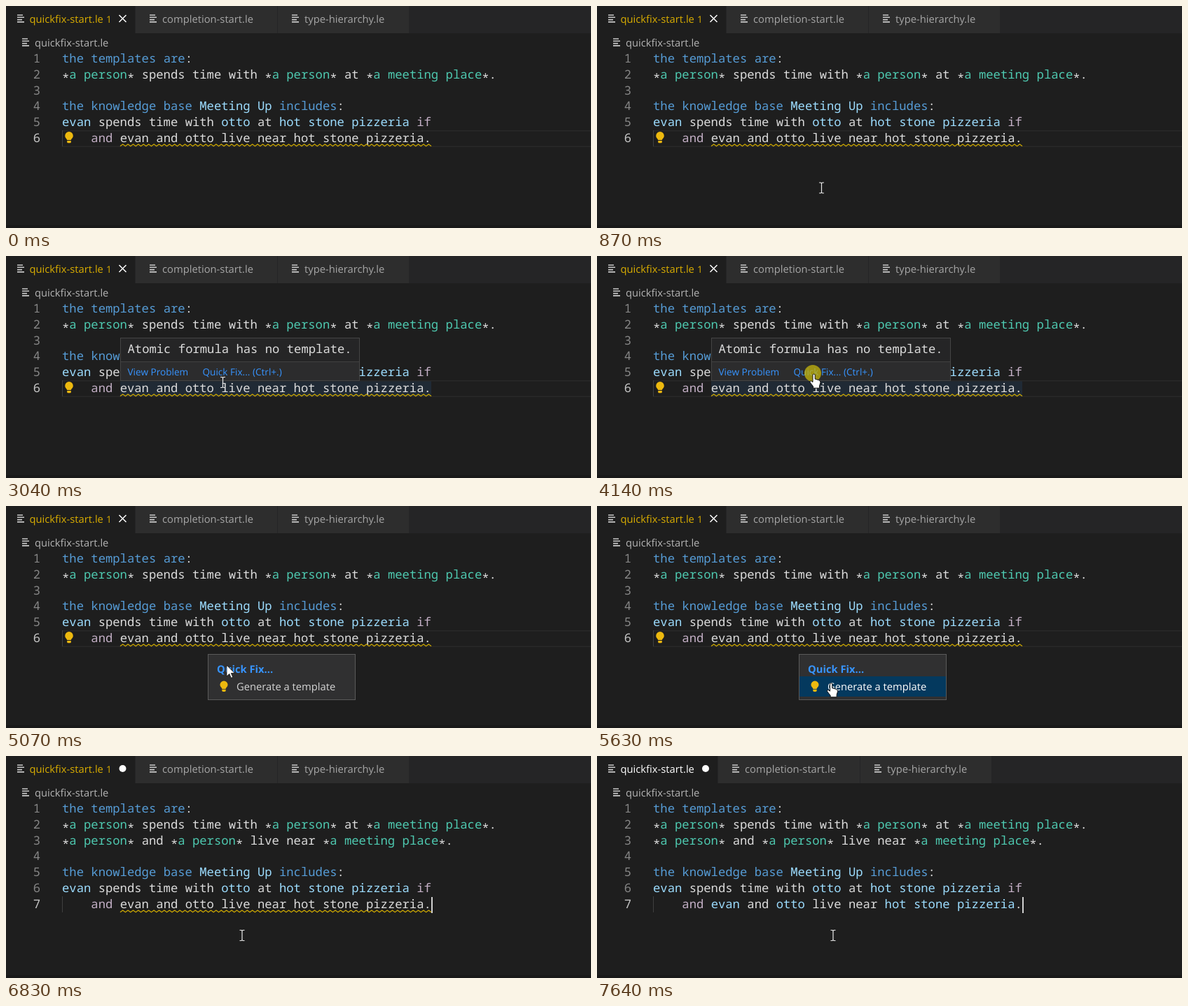
Animation, 835 px wide and 318 px high, one loop 8 s. Source, as an HTML page:

```html
<!DOCTYPE html>
<html lang="en">
<head>
<meta charset="utf-8">
<title>Quick fix demo</title>
<style>
  html, body { margin: 0; width: 100%; height: 100%; overflow: hidden; background: #1e1e1e; }
  svg { display: block; }
  text { white-space: pre; text-rendering: geometricPrecision; font: 14.75px "Open Sans", "Noto Sans", sans-serif; }
  .code { font: 500 17.22px "Noto Sans Mono", "DejaVu Sans Mono", monospace; }
  .small { font-size: 13.6px; }
  .bold { font-weight: 700; }
</style>
</head>
<body>
<svg id="stage" width="835" height="318" viewBox="0 0 835 318"></svg>
<script>
const LOOP = 8000, STEP = 70, CHAR = 10.332, LEFT = 80;
const COLOR = { plain: '#dcdcdc', key: '#569cd6', type: '#4ec9b0', name: '#9cdcfe', word: '#c4b0c6' };
const stage = document.getElementById('stage');

function el(parent, tag, attrs = {}, content) {
  const node = document.createElementNS('http://www.w3.org/2000/svg', tag);
  for (const k in attrs) node.setAttribute(k, attrs[k]);
  if (content !== undefined) node.textContent = content;
  parent.appendChild(node);
  return node;
}
const group = (parent = stage) => el(parent, 'g');
const rect = (p, x, y, width, height, fill, more) => el(p, 'rect', { x, y, width, height, fill, ...more });
const label = (p, x, y, fill, s, more) => el(p, 'text', { x, y, fill, ...more }, s);
const path = (p, d, stroke, width, fill = 'none') => el(p, 'path', { d, stroke, 'stroke-width': width, fill });
const show = (node, on) => node.setAttribute('visibility', on ? 'inherit' : 'hidden');
const place = (node, x, y) => node.setAttribute('transform', `translate(${x} ${y})`);
const baseline = row => Math.round(81 + 22.83 * (row - 1));

// Words sit on the character grid; asterisks are centred on the lowercase letters.
function code(parent, x, y, tokens) {
  for (const [kind, s] of tokens) {
    let col = 0;
    for (const part of s.split(/(\*|\s+)/)) {
      if (part.trim()) label(parent, x + col * CHAR, y + (part === '*' ? 4.5 : 0), COLOR[kind], part, { class: 'code' });
      col += part.length;
    }
    x += col * CHAR;
  }
}
const line = (parent, row, tokens) => code(parent, LEFT, baseline(row), tokens);

function numbers(parent, from, to, active) {
  for (let n = from; n <= to; n++)
    label(parent, 49, baseline(n), n === active ? '#c6c6c6' : '#858585', n, { class: 'code', 'text-anchor': 'end' });
}

function fileIcon(parent, x, y) {
  path(parent, `M${x + 1} ${y}h8M${x + 1} ${y + 3.3}h10M${x + 1} ${y + 6.6}h7M${x + 1} ${y + 9.9}h10`, '#c8c8c8', 1.6);
}

function bulb(parent, x, y, scale = 1) {
  const g = el(parent, 'g', { transform: `translate(${x} ${y}) scale(${scale})` });
  path(g, 'M-2.8 3.6C-2.8 1.8-5.8.6-5.8-2.6A5.8 5.8 0 0 1 5.8-2.6C5.8.6 2.8 1.8 2.8 3.6Z', 'none', 0, '#edb90f');
  path(g, 'M-2.8 4.4h5.6v2q0 1.4-1.4 1.4h-2.8q-1.4 0-1.4-1.4z', 'none', 0, '#edb90f');
}

function tabs(first) {
  const g = group();
  rect(g, 0, 0, first, 39, '#1e1e1e');
  rect(g, first + 1, 0, 202, 39, '#2d2d2d');
  rect(g, first + 204, 0, 187, 39, '#2d2d2d');
  fileIcon(g, 15, 13);
  fileIcon(g, first + 20, 13);
  fileIcon(g, first + 223, 13);
  label(g, first + 39, 24, '#a6a6a6', 'completion-start.le');
  label(g, first + 242, 24, '#a6a6a6', 'type-hierarchy.le');
  return g;
}

// Frame of the editor
rect(stage, 0, 0, 835, 318, '#1e1e1e');
rect(stage, 0, 0, 835, 39, '#252526');
const warnTabs = tabs(184), cleanTabs = tabs(172);
label(warnTabs, 33.5, 24, '#d9ad00', 'quickfix-start.le');
label(warnTabs, 143, 24, '#d9ad00', '1', { class: 'small' });
const closeMark = group(warnTabs);
path(closeMark, 'M161.5 13l10 10M171.5 13l-10 10', '#fff', 1.5);
const dirtyMark = el(warnTabs, 'circle', { cx: 166.5, cy: 18, r: 5, fill: '#fff' });
label(cleanTabs, 33.5, 24, '#fff', 'quickfix-start.le');
el(cleanTabs, 'circle', { cx: 155, cy: 18, r: 5, fill: '#fff' });
fileIcon(stage, 22, 47);
label(stage, 41, 58, '#b4b4b4', 'quickfix-start.le');
rect(stage, 0, 314, 835, 4, '#191919');

// Text
line(stage, 1, [['key', 'the templates are'], ['plain', ':']]);
line(stage, 2, [['plain', '*'], ['type', 'a person'], ['plain', '* spends time with *'], ['type', 'a person'],
  ['plain', '* at *'], ['type', 'a meeting place'], ['plain', '*.']]);

function knowledge(parent, row) {
  line(parent, row, [['key', 'the knowledge base '], ['name', 'Meeting Up'], ['key', ' includes'], ['plain', ':']]);
  line(parent, row + 1, [['name', 'evan'], ['plain', ' spends time with '], ['name', 'otto'], ['plain', ' at '],
    ['name', 'hot stone pizzeria '], ['word', 'if']]);
  const top = baseline(row + 2) - 17;
  rect(parent, LEFT, top, 1, 23, '#404040');
  line(parent, row + 2, [['word', '    and']]);
}

function flagged(parent, row) {
  const y = baseline(row);
  line(parent, row, [['plain', '        evan and otto live near hot stone pizzeria.']]);
  let d = `M163 ${y + 5.8}`;
  for (let i = 1; i <= 120; i++) d += `L${163 + i * 3.7} ${y + (i % 2 ? 3 : 5.8)}`;
  path(parent, d, '#cca700', 1.3);
}

const before = group(), after = group();
const rangeMark = rect(before, 163, 178, 444, 23, '#202a35');
rect(before, LEFT, 178, 755, 1.5, '#292929');
rect(before, LEFT, 200.5, 755, 1.5, '#292929');
numbers(before, 1, 6, 6);
knowledge(before, 4);
flagged(before, 6);
bulb(before, 90, 188.5);

numbers(after, 1, 7, 7);
line(after, 3, [['plain', '*'], ['type', 'a person'], ['plain', '* and *'], ['type', 'a person'],
  ['plain', '* live near *'], ['type', 'a meeting place'], ['plain', '*.']]);
knowledge(after, 5);
const unsolved = group(after), solved = group(after);
flagged(unsolved, 7);
line(solved, 7, [['name', '        evan'], ['plain', ' and '], ['name', 'otto'], ['plain', ' live near '],
  ['name', 'hot stone pizzeria'], ['plain', '.']]);
const caret = rect(after, 607, 202, 2, 23, '#d0d0d0');

// Problem hover
const hover = group();
rect(hover, 163.5, 117.5, 341, 61, '#252526', { stroke: '#454545' });
rect(hover, 164, 152, 340, 26, '#2c2c2d');
rect(hover, 164, 151, 340, 1, '#414141');
code(hover, 173.5, 139, [['plain', 'Atomic formula has no template.']]);
label(hover, 173.5, 171, '#3794ff', 'View Problem', { class: 'small' });
label(hover, 280.5, 171, '#3794ff', 'Quick Fix... (Ctrl+.)', { class: 'small' });

// Quick fix menu
const menu = group();
rect(menu, 288.5, 212.5, 210, 65, '#303031', { stroke: '#5a5a5a' });
const selected = rect(menu, 289, 244, 209, 29, '#04395e');
label(menu, 301, 239, '#3794ff', 'Quick Fix...', { class: 'bold' });
bulb(menu, 311, 258.5, 0.95);
const action = label(menu, 329, 264, '#d4d4d4', 'Generate a template');
const tip = group();
rect(tip, 345.5, 270.5, 210, 24, '#2b2b2b', { stroke: '#5f5f5f' });
label(tip, 353, 287, '#e0e0e0', 'Enter to Apply, F2 to Preview', { class: 'small' });

// Pointer
const click = el(stage, 'circle', { r: 12, fill: '#c6b60c', opacity: 0.75 });
const pointers = { beam: group(), hand: group(), arrow: group() };
path(pointers.beam, 'M-3.5-7.5h2.4L0-6.6 1.1-7.5h2.4M0-6.6V6.6M-3.5 7.5h2.4L0 6.6 1.1 7.5h2.4', '#e8e8e8', 1.2);
path(pointers.hand, 'M-2 .8Q-.3-1 1.2 .8V7l5 1.4q3 .8 2.8 3.6L7.6 16.5V20H-1.4V17.6L-5.8 12Q-6.6 9.8-4.6 9.6L-2 11.4Z', '#111', 1, '#fff');
path(pointers.arrow, 'M0 0V16L3.8 12.4 6.3 18.3 8.8 17.2 6.3 11.5H11.3Z', '#111', 0.8, '#fff');

const route = [
  [190, 748, 309], [400, 469.5, 238.5], [660, 469.5, 238.5], [730, 430, 262], [800, 360, 266], [870, 320.5, 260.5],
  [1590, 320.5, 260.5], [2160, 309.5, 192.5], [2630, 309.5, 192.5], [3040, 309.5, 181], [3520, 309.5, 181],
  [3590, 309.5, 176], [3870, 310, 169], [4930, 310, 170], [5000, 312, 198], [5070, 315, 228], [5700, 337, 257]
];

function pointerAt(t) {
  const i = route.findLastIndex(k => k[0] <= t);
  if (i < 0) return null;
  const a = route[i], b = route[i + 1];
  if (!b) return [a[1], a[2]];
  const p = Math.floor((t - a[0]) / STEP) * STEP / (b[0] - a[0]);
  return [a[1] + (b[1] - a[1]) * p, a[2] + (b[2] - a[2]) * p];
}

function pointerKind(t, y) {
  if (t < 3590 || t >= 6630) return 'beam';
  if (t < 4340) return 'hand';
  return y >= 244 ? 'hand' : 'arrow';
}

function render(t) {
  const within = (from, to) => t >= from && t < to;
  const edited = t >= 6700, fixed = t >= 6960, hovering = within(2230, 4340);
  const at = pointerAt(t);

  show(warnTabs, !fixed);
  show(cleanTabs, fixed);
  show(closeMark, !edited);
  show(dirtyMark, edited);
  show(before, !edited);
  show(after, edited);
  show(unsolved, !fixed);
  show(solved, fixed);
  show(caret, !within(7160, 7640));
  show(hover, hovering);
  show(rangeMark, hovering);
  hover.setAttribute('opacity', Math.min(1, Math.max(0, (Math.floor((t - 2230) / STEP) + 1) / 3)));

  const onAction = at && t >= 5000 && at[1] >= 244;
  show(menu, within(4340, 6700));
  show(selected, onAction);
  action.setAttribute('fill', onAction ? '#fff' : '#d4d4d4');
  show(tip, within(6230, 6430));

  const kind = at && pointerKind(t, at[1]);
  for (const k in pointers) show(pointers[k], k === kind);
  if (at) place(pointers[kind], ...at);
  const first = within(4140, 4340);
  show(click, first || within(6430, 6630));
  place(click, first ? 308 : 335, first ? 168 : 255);
}

// "inherit" keeps a part hidden whenever its group is hidden.
const start = performance.now();
function tick() {
  render((performance.now() - start) % LOOP);
  requestAnimationFrame(tick);
}
tick();
</script>
</body>
</html>
```
